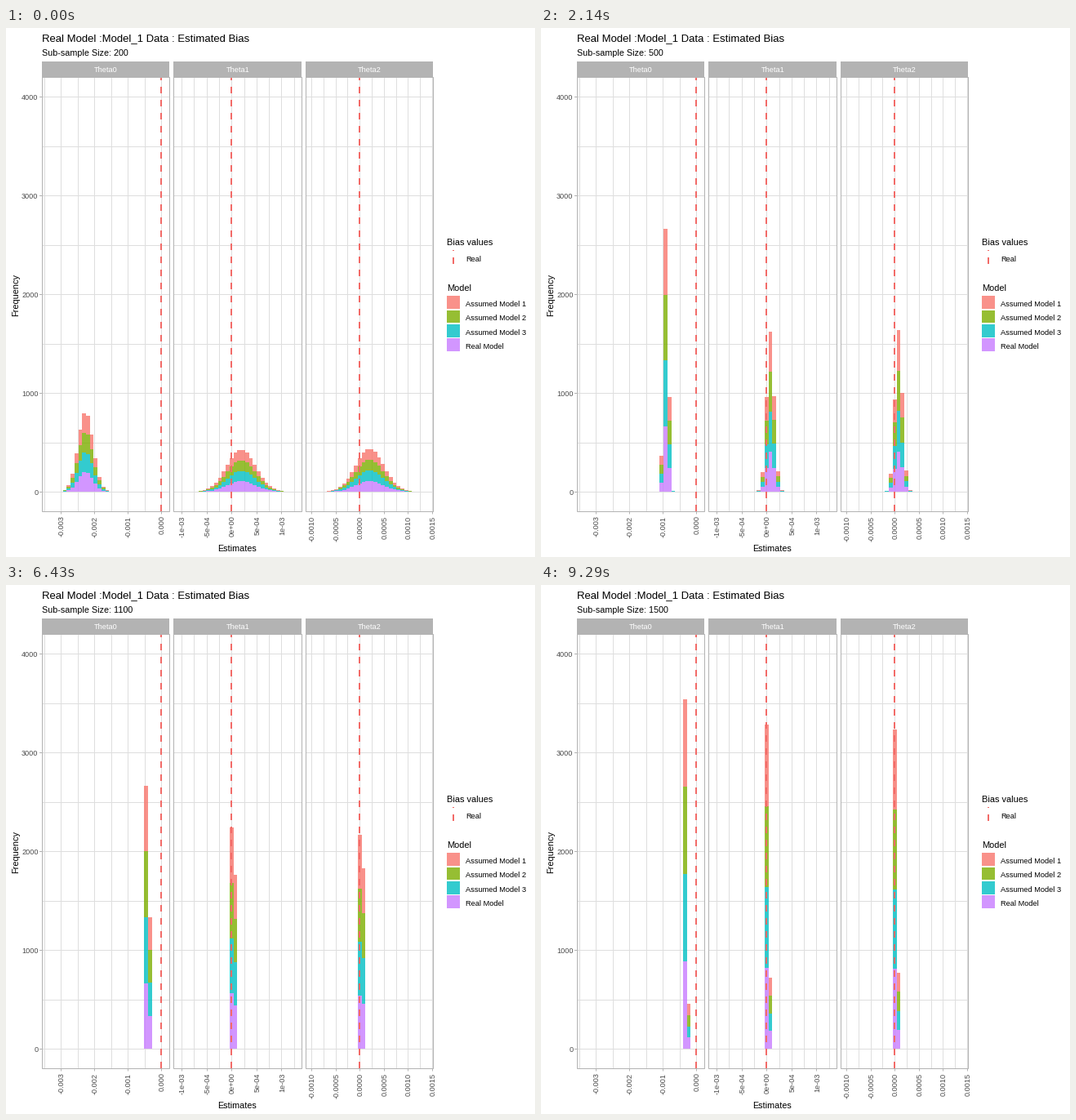
Recreate the animation shown at these times as a matplotlib script. Size 648 by 648 pixels, loop 10000 ms.

```python
import math

import matplotlib.pyplot as plt
from matplotlib.animation import FuncAnimation
from matplotlib.collections import PolyCollection
from matplotlib.patches import Rectangle

plt.rcParams["font.family"] = "Liberation Sans"

SIZE = 648
LOOP, STEP = 10000, 50
FRAMES = LOOP // STEP
SIZES = range(200, 1501, 100)

TOP, BOTTOM, ZERO = 60.5, 592.5, 568.2
PX_PER_COUNT = 0.121
TOTAL = 4000  # estimates per panel
BIN = 4.74
GRID, EDGE, TICK = "#dedede", "#b3b3b3", "#4d4d4d"
DASH = "#f26b68"

MODELS = [  # bottom of the stack first
    ("Real Model", "#c77cff"),
    ("Assumed Model 3", "#00bfc4"),
    ("Assumed Model 2", "#7cae00"),
    ("Assumed Model 1", "#f8766d"),
]

# zero: x of no bias; drift: bias in px times sample size; spread: sd at size 200;
# half: px between grid lines; ks: grid lines counted from zero
PANELS = [
    dict(name="Theta0", zero=190.45, drift=-18588, spread=9.25,
         half=20.5, ks=range(-7, 1), unit=0.0005, fmt=".3f"),
    dict(name="Theta1", zero=276.3, drift=2380, spread=17.6,
         half=15.27, ks=range(-4, 6), unit=0.00025, fmt=".0e"),
    dict(name="Theta2", zero=433.3, drift=2450, spread=17.4,
         half=14.8, ks=range(-4, 7), unit=0.00025, fmt=".4f"),
]

fig = plt.figure(figsize=(SIZE / 72, SIZE / 72), dpi=72, facecolor="white")
ax = fig.add_axes([0, 0, 1, 1])
ax.set_xlim(0, SIZE)
ax.set_ylim(SIZE, 0)
ax.axis("off")


def line(xs, ys, color, width=1, z=1, **kw):
    ax.plot(xs, ys, color=color, lw=width, zorder=z, snap=False,
            solid_capstyle="butt", solid_joinstyle="miter",
            dash_capstyle="butt", **kw)


def label(x, y, s, size, color="black", ha="left", va="baseline", **kw):
    return ax.text(x, y, s, fontsize=size, color=color, ha=ha, va=va, **kw)


def box(x, y, w, h, color, **kw):
    ax.add_patch(Rectangle((x, y), w, h, fc=color, lw=0, antialiased=False, **kw))


def dashes(x, bottom, top):
    line([x, x], [bottom, top], DASH, 2, 4, linestyle=(0, (4, 4)))


def row(count):
    """Centre of the pixel row for a count."""
    return round(ZERO - count * PX_PER_COUNT) + 0.5


def draw_panel(i, p):
    x0 = math.floor(44 + 161.5 * i) + 0.5
    x1 = math.floor(200.5 + 161.5 * i) + 0.5
    for count in range(0, 4001, 500):
        line([x0, x1], [row(count)] * 2, GRID)
    for k in p["ks"]:
        x = round(p["zero"] + k * p["half"]) + 0.5
        line([x, x], [TOP, BOTTOM], GRID)
        if k % 2 == 0:
            line([x, x], [BOTTOM, BOTTOM + 3], EDGE)
            label(x + 1, 597.5, format(k * p["unit"], p["fmt"]), 9.1, TICK,
                  "center", "top", rotation=90)
    dashes(round(p["zero"]), 592, 60)
    line([x0, x1, x1, x0, x0], [TOP, TOP, BOTTOM, BOTTOM, TOP], EDGE, 1, 5)
    box(x0 - 0.5, 41, x1 - x0, 20, EDGE, zorder=5)
    label((x0 + x1) / 2, 54.5, p["name"], 9.1, "white", "center", zorder=6)


def draw_legend():
    label(540, 266, "Bias values", 11)
    dashes(548, 289, 272)
    label(563, 286, "Real", 9.2)
    label(540, 322, "Model", 11)
    for i, (name, color) in enumerate(reversed(MODELS)):
        top, bottom = round(328.3 + 17.28 * i), round(344 + 17.28 * i)
        box(540, top, 16, bottom - top, color, alpha=0.8)
        label(563, 341 + 17.28 * i, name, 9.2)


def stacks(n):
    """One list of rectangles per model: equal quarters of a binned bell curve."""
    parts = [[] for _ in MODELS]
    for p in PANELS:
        mu = p["zero"] + p["drift"] / n
        sd = p["spread"] * (200 / n) ** 1.5

        def below(x):
            return TOTAL * 0.5 * (1 + math.erf((x - mu) / sd / math.sqrt(2)))

        for k in range(-30, 31):
            left = p["zero"] + (k - 0.5) * BIN
            height = (below(left + BIN) - below(left)) * PX_PER_COUNT
            a, b = round(left), round(left + BIN)
            ys = [round(ZERO - height * q / 4) for q in range(5)]
            for part, lo, hi in zip(parts, ys, ys[1:]):
                if lo > hi:
                    part.append([(a, lo), (b, lo), (b, hi), (a, hi)])
    return parts


for i, panel in enumerate(PANELS):
    draw_panel(i, panel)
draw_legend()

for count in range(0, 4001, 1000):
    y = row(count)
    line([41, 44], [y, y], EDGE)
    label(39.5, y + 3.5, str(count), 9.1, TICK, "right")

label(44, 16.5, "Real Model :Model_1 Data : Estimated Bias", 13.13)
subtitle = label(44, 34, "", 10.75)
label(12, 327, "Frequency", 11, ha="center", va="center", rotation=90)
label(283, 641, "Estimates", 10.7, ha="center")

bars = []
for _, color in MODELS:
    coll = PolyCollection([], facecolors=color, alpha=0.8, linewidths=0,
                          antialiaseds=False, zorder=3)
    ax.add_collection(coll, autolim=False)
    bars.append(coll)

states = [stacks(n) for n in SIZES]


def update(frame):
    i = ((frame + 1) * len(SIZES) - 1) // FRAMES
    subtitle.set_text(f"Sub-sample Size: {SIZES[i]}")
    for coll, rects in zip(bars, states[i]):
        coll.set_verts(rects)
    return [subtitle, *bars]


anim = FuncAnimation(fig, update, frames=FRAMES, interval=STEP,
                     repeat=True, repeat_delay=0, blit=False)
plt.show()
```
